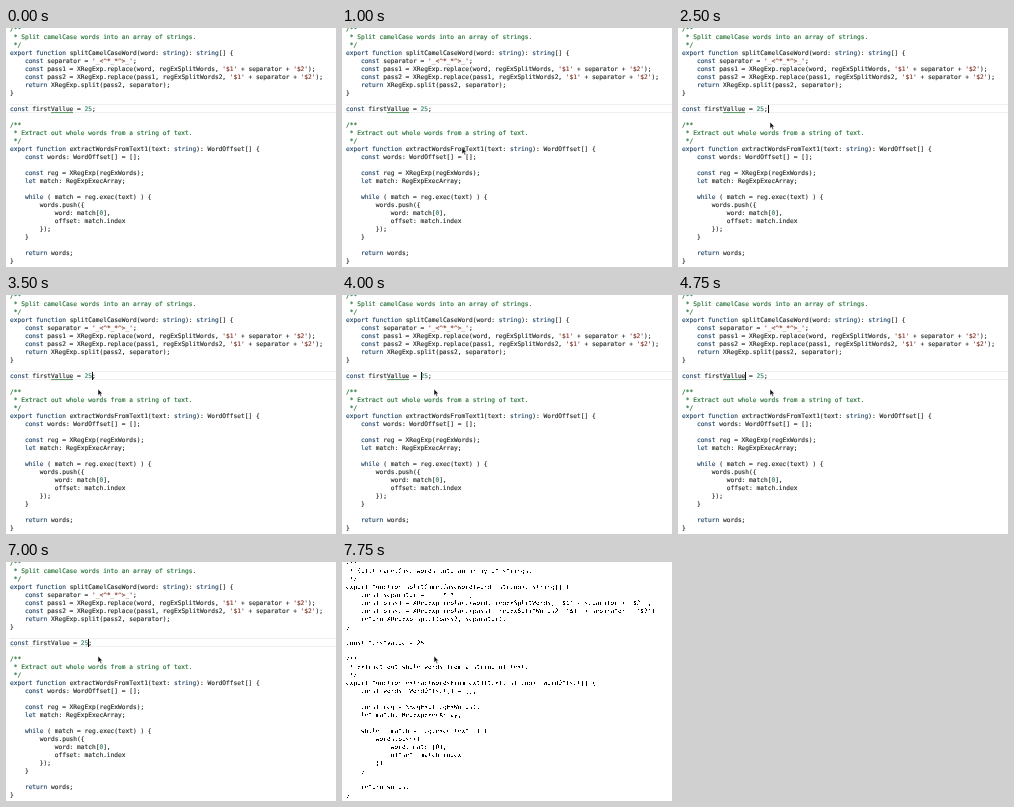
These frames come from a looping animation (330x239 px, 8 s). An HTML page:

```html
<!DOCTYPE html>
<html lang="en">
<head>
<meta charset="utf-8">
<title>Fixing a misspelled constant</title>
<style>
  html, body { margin: 0; width: 100%; height: 100%; overflow: hidden; background: #fff; }
  svg { display: block; width: 330px; height: 239px; }
  text {
    font: 6.2px "DejaVu Sans Mono", monospace;
    text-rendering: geometricPrecision;
    white-space: pre;
    color: #1c2420;
  }
  text, tspan { fill: currentColor; stroke: currentColor; stroke-width: .12; }
  .comment { color: #1c6b2e; }
  .keyword { color: #1b3f63; }
  .string { color: #7d2f22; }
  .number { color: #2c7a58; }
  .washed { filter: url(#threshold); }
</style>
</head>
<body>
<svg viewBox="0 0 330 239">
  <filter id="threshold" filterUnits="userSpaceOnUse" x="0" y="0" width="330" height="239"
          color-interpolation-filters="sRGB">
    <feComponentTransfer>
      <feFuncR type="linear" slope="0"/>
      <feFuncG type="linear" slope="0"/>
      <feFuncB type="linear" slope="0"/>
      <feFuncA type="discrete" tableValues="0 0 0 1 1"/>
    </feComponentTransfer>
  </filter>
  <path id="band" d="M3 76.5H330M3 84.5H330" stroke="#efefef"/>
  <g id="code"></g>
  <path id="squiggle" fill="none" stroke="#2f7a3a" stroke-width=".8"/>
  <rect id="caret" y="77" width="1" height="8" fill="#111"/>
  <path id="pointer" d="M0 0V6.4L1.5 5.1L2.6 7.5L3.7 7L2.6 4.7H4.6Z"
        fill="#111" stroke="#fff" stroke-width=".5"/>
</svg>
<script>
const LEFT = 4, ADVANCE = 3.73, LINE = 8, LOOP = 8000, STEP = 250;
const EDIT_ROW = 10;
const lines = `/**
 * Split camelCase words into an array of strings.
 */
export function splitCamelCaseWord(word: string): string[] {
    const separator = '_<^*_*^>_';
    const pass1 = XRegExp.replace(word, regExSplitWords, '$1' + separator + '$2');
    const pass2 = XRegExp.replace(pass1, regExSplitWords2, '$1' + separator + '$2');
    return XRegExp.split(pass2, separator);
}

const firstVallue = 25;

/**
 * Extract out whole words from a string of text.
 */
export function extractWordsFromText1(text: string): WordOffset[] {
    const words: WordOffset[] = [];

    const reg = XRegExp(regExWords);
    let match: RegExpExecArray;

    while ( match = reg.exec(text) ) {
        words.push({
            word: match[0],
            offset: match.index
        });
    }

    return words;
}`.split("\n");

// [start ms, value]; each value holds until the next start
const caretSteps = [
  [0, null], [2250, 23], [2750, null], [3000, 23], [3500, 22], [3750, 21],
  [4000, 20], [4250, 19], [4500, 18], [4750, 17], [5000, 16], [5250, 15],
  [5500, 14], [6000, 15], [6500, 17], [6750, 19], [7000, 21], [7250, 22],
  [7500, null]
];
const pointerSteps = [
  [0, null], [750, [140, 132]], [1000, [120, 119.5]], [1250, [108, 109]],
  [1500, [98, 100]], [1750, [92, 94]]
];
const FIXED_AT = 5500, CHECKED_AT = 5750, WASHED_AT = 7750;

const byId = id => document.getElementById(id);
const column = n => LEFT + n * ADVANCE;
const valueAt = (steps, t) => steps.filter(([start]) => start <= t).pop()[1];
const show = (el, on) => el.setAttribute("visibility", on ? "visible" : "hidden");

const tokens = /(^\/\*\*|^ \*.*)|\b(export|function|const|let|return|while|string)\b|('[^']*')|\b(\d+)\b/g;
const kinds = ["comment", "keyword", "string", "number"];

function paint(el, line) {
  const escaped = line.replace(/&/g, "&amp;").replace(/</g, "&lt;").replace(/>/g, "&gt;");
  el.innerHTML = escaped.replace(tokens, (word, ...groups) => {
    const kind = kinds[groups.slice(0, 4).findIndex(Boolean)];
    return `<tspan class="${kind}">${word}</tspan>`;
  });
}

const rows = lines.map((line, i) => {
  const row = document.createElementNS("http://www.w3.org/2000/svg", "text");
  row.setAttribute("x", LEFT);
  row.setAttribute("y", i * LINE + 3.3);
  paint(row, line);
  byId("code").append(row);
  return row;
});

function wave(from, to, y) {
  let d = `M${column(from)} ${y}`;
  for (let x = column(from) + 1, up = true; x <= column(to); x++, up = !up) {
    d += `L${x} ${y + (up ? -0.8 : 0)}`;
  }
  return d;
}

let misspelled = true;
function draw(t) {
  const wrong = t < FIXED_AT, washed = t >= WASHED_AT;
  if (wrong !== misspelled) {
    misspelled = wrong;
    paint(rows[EDIT_ROW], wrong ? lines[EDIT_ROW] : lines[EDIT_ROW].replace("ll", "l"));
  }
  byId("code").classList.toggle("washed", washed);
  show(byId("band"), !washed);

  show(byId("squiggle"), t < CHECKED_AT);
  byId("squiggle").setAttribute("d", wave(11, wrong ? 17 : 16, 85));

  const at = valueAt(caretSteps, t);
  show(byId("caret"), at !== null);
  if (at !== null) byId("caret").setAttribute("x", Math.round(column(at)));

  const spot = valueAt(pointerSteps, t);
  show(byId("pointer"), spot);
  if (spot) byId("pointer").setAttribute("transform", `translate(${spot})`);
}

let origin, last = -1;
function tick(now) {
  origin ??= now;
  const t = Math.floor((now - origin) % LOOP / STEP) * STEP;
  if (t !== last) draw(last = t);
  requestAnimationFrame(tick);
}
draw(0);
requestAnimationFrame(tick);
</script>
</body>
</html>
```
